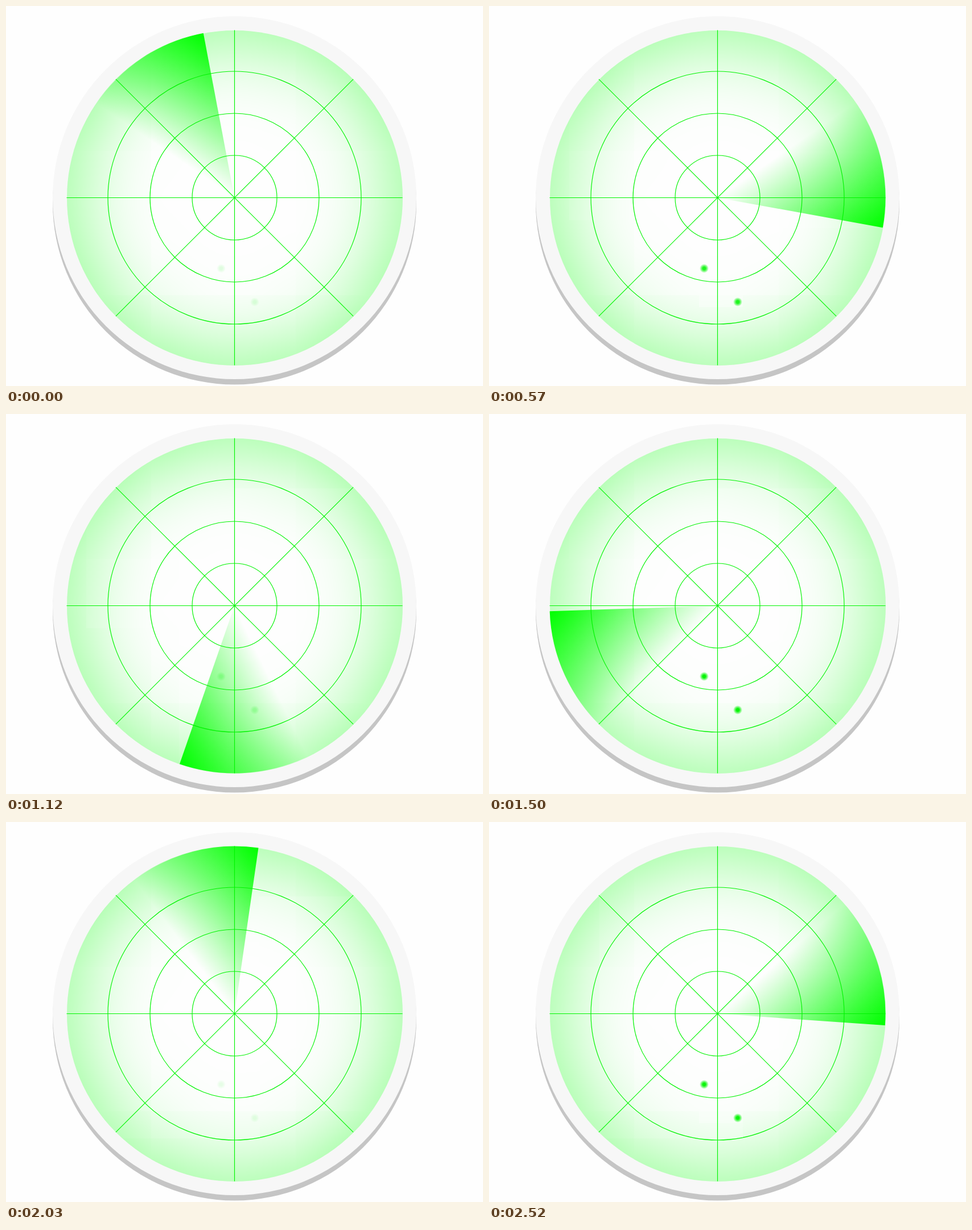
Animation, 838 px wide and 669 px high, one loop 2600 ms. Source, as an HTML page:

```html
<!DOCTYPE html>
<html lang="en">
<head>
<meta charset="utf-8">
<title>Radar</title>
<style>
  html, body { margin: 0; width: 100%; height: 100%; overflow: hidden; background: #fefefe; }
  svg { position: absolute; left: 0; top: 0; }
  #dial {
    position: absolute; left: 106.5px; top: 42.5px; width: 590px; height: 590px;
    border-radius: 50%; background: #fefefe;
    box-shadow: inset 0 0 150px rgba(0, 255, 0, .5);
  }
</style>
</head>
<body>
<svg width="838" height="669" viewBox="0 0 838 669">
  <circle cx="401.5" cy="347" r="319.5" fill="#c5c5c5"/>
  <circle cx="401.5" cy="337.5" r="319.5" fill="#f7f7f7"/>
</svg>
<div id="dial"></div>
<svg width="838" height="669" viewBox="0 0 838 669">
  <defs>
    <linearGradient id="glow" gradientUnits="userSpaceOnUse" x1="0" y1="0" x2="147.5" y2="-147.5">
      <stop offset="0" stop-color="#0f0" stop-opacity="0"/>
      <stop offset="1" stop-color="#0f0"/>
    </linearGradient>
    <radialGradient id="dot">
      <stop offset=".3" stop-color="#00f400"/>
      <stop offset=".6" stop-color="#00f400" stop-opacity=".6"/>
      <stop offset="1" stop-color="#00f400" stop-opacity="0"/>
    </radialGradient>
  </defs>
  <g transform="translate(401.5 337.5)">
    <path id="beam" d="M0 0V-295A295 295 0 0 0 -208.6 -208.6Z" fill="url(#glow)"/>
    <g id="grid" fill="none" stroke="#00f400" stroke-width="1.15"></g>
    <g id="blips" fill="url(#dot)">
      <circle cx="-23.5" cy="124.5" r="8"/>
      <circle cx="35.5" cy="183.5" r="8"/>
    </g>
  </g>
</svg>
<script>
const LOOP = 2600, STEPS = 34;
const $ = id => document.getElementById(id);

// [step, start in ms]
const pace = [[0, 0], [1, 70], [8, 570], [9, 660], [15, 1120], [16, 1200], [20, 1500], [21, 1570],
  [23, 1720], [24, 1810], [25, 1870], [29, 2190], [30, 2260], [31, 2360], [33, 2520]];
// [step, beam angle in degrees, clockwise from the top]
const sweep = [[0, -10.7], [8, 100.3], [15, 199.1], [20, 268.1], [23, 313.1], [24, 325.1],
  [29, 396.9], [30, 412], [33, 454]];

function along(knots, x) {
  let i = 1;
  while (i < knots.length - 1 && knots[i][0] < x) i++;
  const [x0, y0] = knots[i - 1], [x1, y1] = knots[i];
  return y0 + (y1 - y0) * (x - x0) / (x1 - x0);
}

const starts = Array.from({ length: STEPS }, (_, i) => Math.round(along(pace, i) / 10) * 10);

const rings = [74.5, 148.5, 222.5].map(r => `<circle r="${r}"/>`);
const spokes = [0, 45, 90, 135].map(a => `<path d="M-295 0H295" transform="rotate(${a})"/>`);
$("grid").innerHTML = rings.concat(spokes).join("");

function draw(ms) {
  let step = STEPS - 1;
  while (step > 0 && starts[step] > ms) step--;
  const angle = along(sweep, step);
  const phase = (angle + 180) % 180;
  $("beam").setAttribute("transform", `rotate(${angle})`);
  $("blips").setAttribute("opacity", 1 - Math.abs(phase - 90) / 90);
}

const begin = performance.now();
function tick() {
  draw((performance.now() - begin) % LOOP);
  requestAnimationFrame(tick);
}
tick();
</script>
</body>
</html>
```
